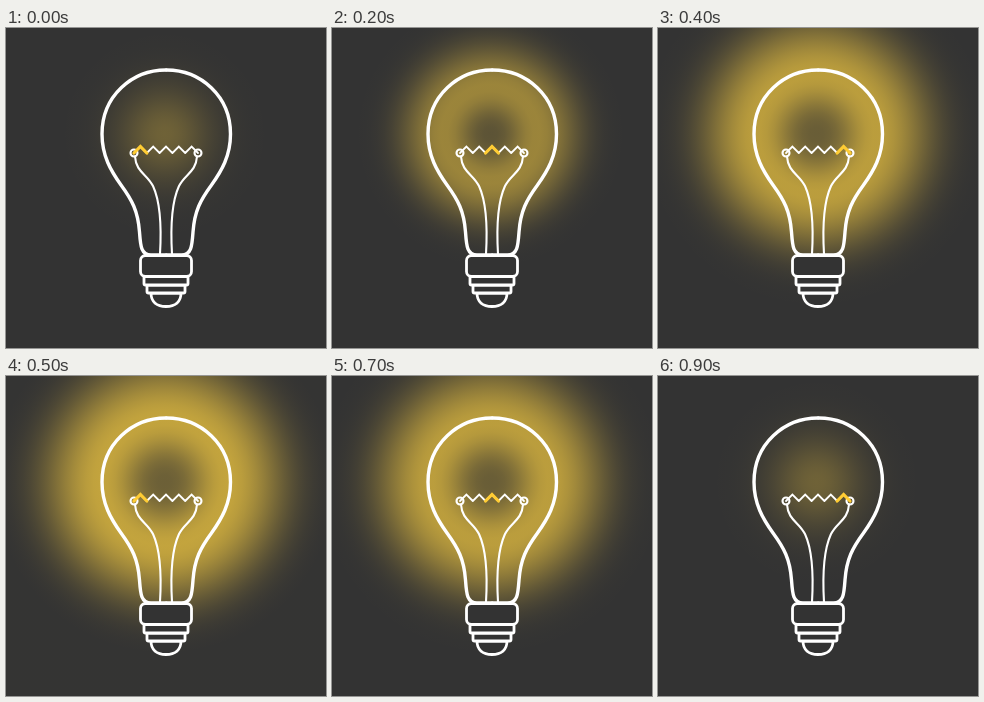
Animation, 320 px wide and 320 px high, one loop 1 s. Source, as an HTML page:

```html
<!DOCTYPE html>
<html lang="en">
<head>
<meta charset="utf-8">
<title>Light bulb</title>
<style>
  html, body { margin: 0; height: 100%; overflow: hidden; background: #333; }
  svg { display: block; width: 100%; height: 100%; }
</style>
</head>
<body>
<svg viewBox="0 0 320 320" fill="none" stroke="#fff" stroke-linecap="round" stroke-linejoin="round">
  <defs>
    <radialGradient id="glow" gradientUnits="userSpaceOnUse" cx="158.500" cy="106" r="170"></radialGradient>
    <path id="wire" d="M129 128.500C130 144 141 146 147 158C153 171 156 192 154 226"/>
    <path id="side" d="M160 42C126 42 96 68 96 106C96 128 105 143 115 157C126 172 132 183 133.500 204C134.500 218 135 227 145 227H160"/>
  </defs>
  <rect width="320" height="320" fill="#333" stroke="none"/>
  <rect width="320" height="320" fill="url(#glow)" stroke="none"/>

  <g stroke-width="2.100">
    <use href="#wire"/>
    <use href="#wire" transform="matrix(-1 0 0 1 320 0)"/>
    <circle cx="128" cy="125" r="3.500"/>
    <circle cx="192" cy="125" r="3.500"/>
    <path id="filament" stroke-width="1.800" stroke-linejoin="miter"/>
  </g>
  <path id="spark" stroke="#fc3" stroke-width="3.200" stroke-linejoin="miter"/>

  <g stroke-width="3.400">
    <use href="#side"/>
    <use href="#side" transform="matrix(-1 0 0 1 320.500 0)"/>
  </g>
  <g fill="#333" stroke-width="2.800">
    <path d="M145 265H175C175 274 169 278.500 160 278.500S145 274 145 265Z"/>
    <rect x="141" y="257" width="38" height="8" rx="1.500"/>
    <rect x="138" y="248.500" width="44" height="8.500" rx="1.500"/>
    <rect x="134.500" y="227.500" width="51" height="21" rx="5"/>
  </g>
</svg>
<script>
  const $ = id => document.getElementById(id);
  const radius = 170, rings = 24, teeth = 5, pitch = 64 / teeth;

  const stops = Array.from({ length: rings + 1 }, (_, i) => {
    const stop = document.createElementNS('http://www.w3.org/2000/svg', 'stop');
    stop.setAttribute('offset', i / rings);
    stop.setAttribute('stop-color', 'rgb(245,203,65)');
    return $('glow').appendChild(stop);
  });

  // A soft disc that grows with power (0 to 1) and opens a dim centre
  function glow(r, power) {
    const ease = 1 - (1 - power) ** 2;
    const open = Math.min(1, power * 3);
    const size = 45 + 72 * ease;
    const disc = Math.exp(-((r / size) ** (2 + 2 * open)));
    const hole = 0.66 * open * Math.exp(-((r / (size * 0.385)) ** 2.5));
    return (0.31 + 0.57 * ease) * disc * (1 - hole);
  }

  function tooth(i) {
    const x = 128 + i * pitch;
    return `M${x} 125L${x + pitch / 2} 118.500L${x + pitch} 125`;
  }
  $('filament').setAttribute('d',
    Array.from({ length: teeth }, (_, i) => tooth(i)).join(''));

  function draw(time) {
    const step = Math.floor(time % 1000 / 100);
    const power = Math.min(step / 6, (9 - step) / 3);
    stops.forEach((stop, i) =>
      stop.setAttribute('stop-opacity', glow(i / rings * radius, power)));
    $('spark').setAttribute('d', tooth(step % teeth));
  }

  const start = performance.now();
  function tick() {
    draw(performance.now() - start);
    requestAnimationFrame(tick);
  }
  tick();
</script>
</body>
</html>
```
